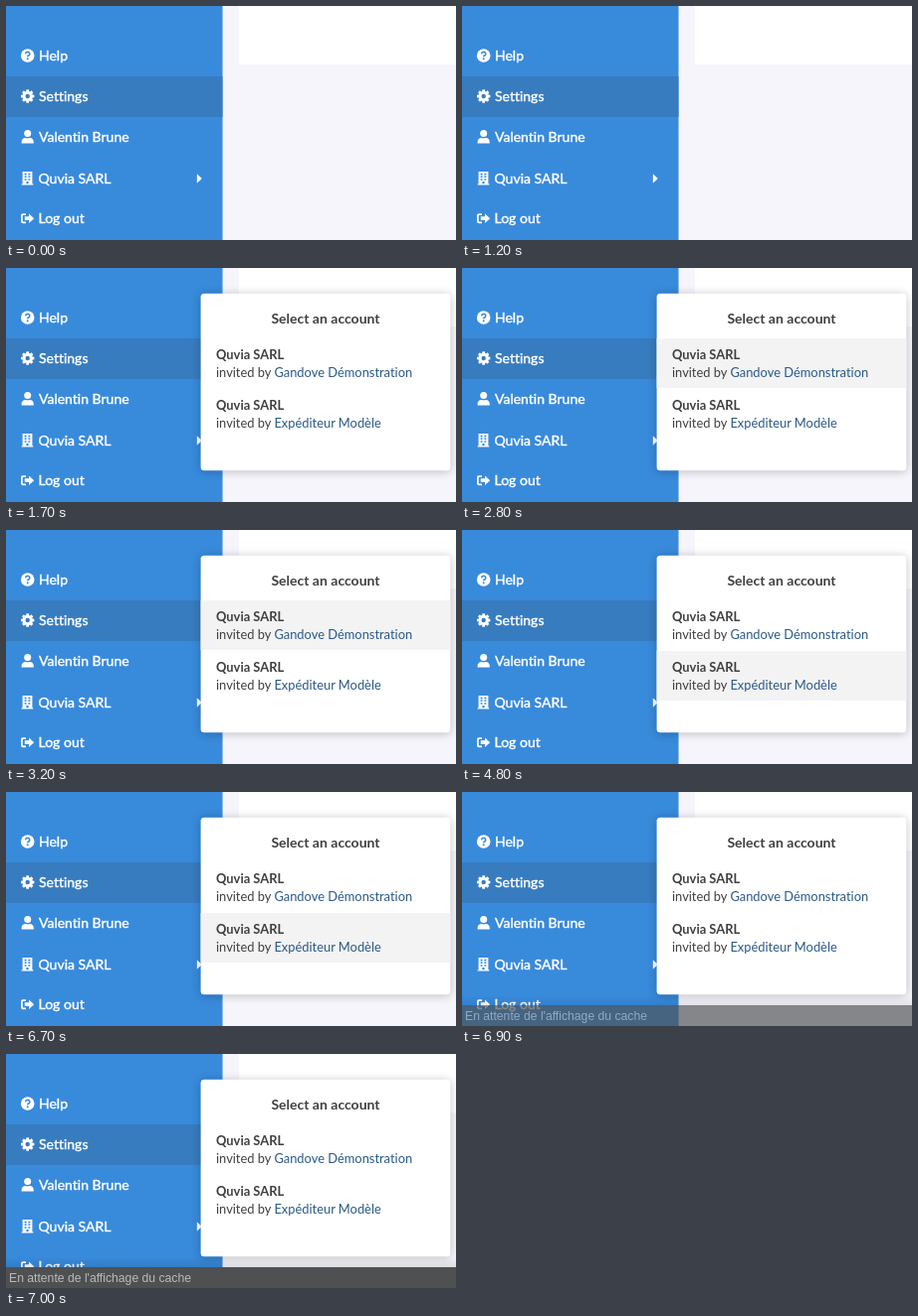
An HTML page that plays this animation: 452x236 px, repeating every 7.1 s.

```html
<!DOCTYPE html>
<html lang="en">
<head>
<meta charset="utf-8">
<title>Account menu</title>
<style>
  html, body { margin: 0; width: 100%; height: 100%; overflow: hidden; }
  svg { display: block; width: 452px; height: 236px; }
  text { font-family: Lato, sans-serif; font-size: 12.88px; fill: #3f3f3f; white-space: pre; font-variant-ligatures: none; }
  .menu text { font-size: 14px; fill: #fff; stroke: #fff; stroke-width: .4px; }
  .icons { fill: #fff; }
  .bold { font-weight: 700; }
  .title { font-size: 14px; text-anchor: middle; }
  .link { fill: #2b5a87; }
  .status text { font-family: "Liberation Sans", Arial, sans-serif; font-size: 12.2px; fill: #b9babb; }
  #popup rect.card { filter: drop-shadow(0 1px 5px rgba(0, 0, 0, .24)); }
</style>
</head>
<body>
<svg viewBox="0 0 452 236">
  <defs>
    <linearGradient id="fade" x1="0" y1="0" x2="0" y2="1">
      <stop offset="0" stop-color="#000" stop-opacity="0"/>
      <stop offset="1" stop-color="#000" stop-opacity=".1"/>
    </linearGradient>
  </defs>
  <rect width="452" height="236" fill="#f5f5fb"/>
  <rect x="234" width="218" height="59" fill="#fff"/>

  <rect width="217.5" height="236" fill="#388adb"/>
  <rect y="71" width="217.5" height="41" fill="#377cbf"/>
  <g class="menu">
    <text x="33" y="55">Help</text>
    <text x="33" y="96">Settings</text>
    <text x="33" y="137">Valentin Brune</text>
    <text x="32.5" y="179">Quvia SARL</text>
    <text x="32.5" y="219">Log out</text>
  </g>
  <g class="icons">
    <circle cx="21.7" cy="50" r="6.8"/>
    <path d="M19.6 48.3a2.1 1.9 0 1 1 3.3 1.5q-1.2.7-1.2 1.5" fill="none" stroke="#388adb" stroke-width="1.6"/>
    <circle cx="21.7" cy="53.3" r="1" fill="#388adb"/>
    <path id="gear" fill-rule="evenodd"/>
    <circle cx="21.7" cy="128.6" r="3.5"/>
    <path d="M15.6 138.6v-1.4q0-4 4.1-4.2 2 .8 4 0 4.1.2 4.1 4.2v1.4z"/>
    <path id="building" fill-rule="evenodd"/>
    <path d="M20 209.2h-3q-2 0-2 2v6q0 2 2 2h3v-1.8h-2.6q-.6 0-.6-.6v-5.2q0-.6.6-.6H20z"/>
    <path d="M23 209.4l5.2 4.8L23 219v-2.9h-4.2v-3.8H23z"/>
    <path d="M191.8 169.3l5 4.7-5 4.7z"/>
  </g>

  <g id="popup">
    <rect class="card" x="195.6" y="25.7" width="250.7" height="178.5" rx="3.5" fill="#fff"/>
    <rect id="hover" x="195.6" width="250.7" height="50" fill="#f3f3f3"/>
    <text class="bold title" x="321" y="56">Select an account</text>
    <text class="bold" x="211" y="92">Quvia SARL</text>
    <text x="211" y="110">invited by <tspan class="link">Gandove Démonstration</tspan></text>
    <text class="bold" x="211" y="143">Quvia SARL</text>
    <text x="211" y="161">invited by <tspan class="link">Expéditeur Modèle</tspan></text>
  </g>

  <g id="status" class="status">
    <rect y="205" width="452" height="10" fill="url(#fade)"/>
    <rect y="215" width="452" height="21" fill="#4e5052"/>
    <text x="3" y="230">En attente de l'affichage du cache</text>
  </g>
</svg>
<script>
  const LOOP = 7100;
  const OPEN = 1700;
  const LEAVE = 6800;
  const ROW_TOPS = [71, 122];
  // The pointer alternates between the two rows at these times.
  const SWITCHES = [2400, 3000, 3200, 3600, 4100, 4600];
  const byId = id => document.getElementById(id);
  const popup = byId("popup"), hover = byId("hover"), statusBar = byId("status");

  function gearPath(cx, cy) {
    const points = [];
    for (let tooth = 0; tooth < 8; tooth++) {
      for (const [offset, r] of [[-.3, 5.2], [-.19, 6.8], [.19, 6.8], [.3, 5.2]]) {
        const a = tooth * Math.PI / 4 + offset;
        points.push(`${(cx + r * Math.cos(a)).toFixed(2)} ${(cy + r * Math.sin(a)).toFixed(2)}`);
      }
    }
    return `M${points.join("L")}ZM${cx - 2.2} ${cy}a2.2 2.2 0 1 0 4.4 0a2.2 2.2 0 1 0-4.4 0z`;
  }

  function buildingPath() {
    let d = "M16.6 167h9.8v12.2h.9v1.3H15.7v-1.3h.9zM20.4 177h2.2v2.2h-2.2z";
    for (const y of [168.8, 171.5, 174.2]) {
      for (const x of [18.6, 22.4]) d += `M${x} ${y}h2v1.6h-2z`;
    }
    return d;
  }

  function show(node, visible) {
    node.setAttribute("visibility", visible ? "visible" : "hidden");
  }

  function draw(t) {
    const count = SWITCHES.filter(time => time <= t).length;
    const open = t >= OPEN;
    show(popup, open);
    show(hover, open && count > 0 && t < LEAVE);
    hover.setAttribute("y", ROW_TOPS[count % 2 ? 0 : 1]);

    const step = Math.floor((t - LEAVE) / 100) + 1;
    statusBar.setAttribute("opacity", Math.max(0, Math.min(1, step / 3)));
  }

  byId("gear").setAttribute("d", gearPath(21.7, 91));
  byId("building").setAttribute("d", buildingPath());

  const start = performance.now();
  function tick() {
    draw((performance.now() - start) % LOOP);
    requestAnimationFrame(tick);
  }
  tick();
</script>
</body>
</html>
```
